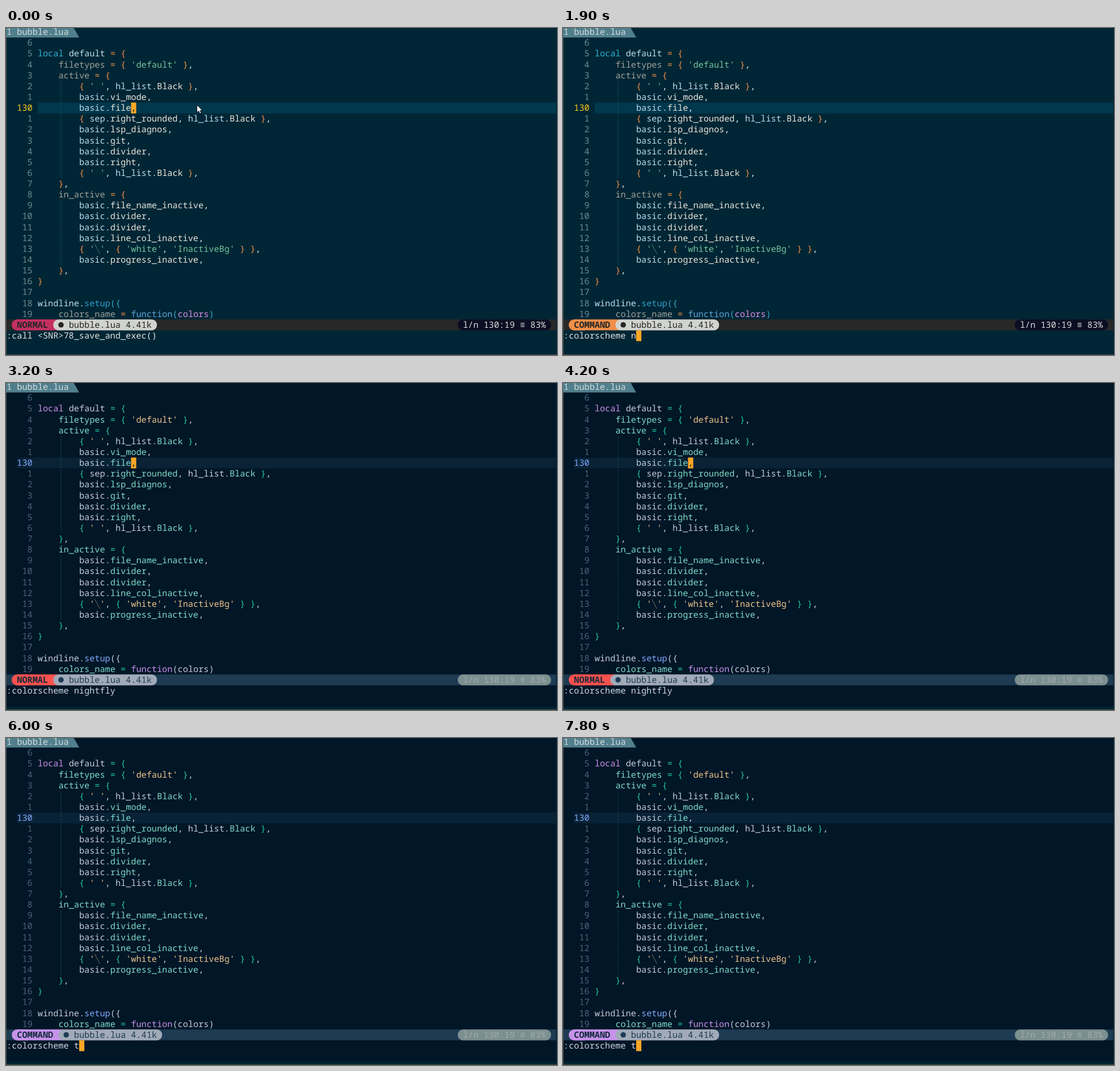
Write an HTML page that moves like this. It is 971 by 577 pixels and loops after 8000 ms.

```html
<!DOCTYPE html>
<html lang="en">
<head>
<meta charset="utf-8">
<title>Editor colorscheme</title>
<style>
html, body { margin: 0; width: 100%; height: 100%; overflow: hidden; background: #002635; }
svg {
  display: block; width: 971px; height: 577px;
  --bg: #002635; --line: #00384d; --num: #6c8b91; --now: #ffcc1b; --guide: #1b5260;
  --text: #d3e6ea; --var: #b9ddee; --field: #e6e6dc; --key: #a1a19a; --word: #2fb1d5;
  --func: #5fa8dc; --call: #2f9fc8; --param: #dd90e8; --op: #f08e48; --paren: #35a9cb;
  --str: #74c59b; --slash: #4b7a70; --cmd: #e0e3de;
  --bar: #282828; --normal: #c43060; --command: #f08e48; --mode: #262626;
  --file: #d0d3cf; --ink: #262626; --pos: #0b0e22; --posText: #dadcda;
}
svg.fly {
  --bg: #011627; --line: #092236; --num: #4b6479; --now: #82aaff; --guide: #1c4c58;
  --text: #c3ccdc; --var: #c3ccdc; --field: #7fdbca; --key: #7fdbca; --word: #c792ea;
  --func: #c792ea; --call: #82aaff; --param: #c3ccdc; --op: #21c7a8; --paren: #c3ccdc;
  --str: #ecc48d; --slash: #7d6d56; --cmd: #d0d6e0;
  --bar: #1d3b53; --normal: #fc514e; --command: #c792ea; --mode: #12293c;
  --file: #a1aab8; --ink: #1d3b53; --pos: #7c8f8f; --posText: #a1aab0;
}
svg.fly .equal { fill: #ff5874; }
text {
  font: 15.23px "Noto Sans Mono", "DejaVu Sans Mono", monospace;
  white-space: pre; text-rendering: geometricPrecision; font-variant-ligatures: none;
}
.bold { font-weight: 700; }
</style>
</head>
<body>
<svg id="stage" viewBox="0 0 971 577"></svg>
<script>
const CW = 9.139, RH = 19.135;
const colX = c => 1 + c * CW;
const rowY = r => -2.4 + r * RH;
const stage = document.getElementById('stage');

function add(tag, attrs, parent = stage) {
  const el = document.createElementNS('http://www.w3.org/2000/svg', tag);
  for (const name in attrs) el.setAttribute(name, attrs[name]);
  return parent.appendChild(el);
}
const paint = color => color[0] === '#' ? color : `var(--${color})`;
const rect = (x, y, width, height, color, rx = 0, parent = stage) =>
  add('rect', { x, y, width, height, rx, style: `fill:${paint(color)}` }, parent);
const cells = (col, row, count, color, parent) =>
  rect(colX(col), rowY(row), count * CW, RH, color, 0, parent);
const pill = (col, count, color, parent) =>
  rect(colX(col), rowY(27), count * CW, RH, color, 9.3, parent);
function write(str, col, row, color, parent, cls = '') {
  const el = add('text', { x: colX(col), y: rowY(row) + 14.6, class: cls,
    style: `fill:${paint(color)}` }, parent);
  el.textContent = str;
  return el;
}

const code = `
local default = {
    filetypes = { 'default' },
    active = {
        { ' ', hl_list.Black },
        basic.vi_mode,
        basic.file,
        { sep.right_rounded, hl_list.Black },
        basic.lsp_diagnos,
        basic.git,
        basic.divider,
        basic.right,
        { ' ', hl_list.Black },
    },
    in_active = {
        basic.file_name_inactive,
        basic.divider,
        basic.divider,
        basic.line_col_inactive,
        { ' ', { 'white', 'InactiveBg' } },
        basic.progress_inactive,
    },
}

windline.setup({
    colors_name = function(colors)`.split('\n');

const words = { local: 'word', function: 'func', setup: 'call', colors: 'param', default: 'var' };
function tokenColor(token, before, after) {
  if (token[0] === "'") return 'str';
  if (words[token]) return words[token];
  if (/\w/.test(token)) return before === '.' ? 'field' : after === '.' ? 'var' : 'key';
  if (/[()]/.test(token) || before === '(') return 'paren';
  return /[{}=]/.test(token) ? 'op' : 'text';
}

// Page, tab and cursor line
rect(1, 0, 969, rowY(30), 'bg');
add('path', { d: 'M0 0H119.5L129 16.7H0Z', fill: '#517f8d' });
write('1 bubble.lua', 0, 0, '#d3dcdb');
const lineBand = cells(6, 7, 100, 'line');
const numberBand = cells(2, 7, 4, 'line');

// Indent guides
for (const [from, to] of [[5, 14], [16, 22]])
  add('path', { d: `M${colX(10.5)} ${rowY(from) + 1}V${rowY(to)}`,
    style: 'stroke:var(--guide)', 'stroke-dasharray': '3 1.784' });

code.forEach((line, i) => {
  const row = i + 1, current = row === 7;
  const label = String(current ? 130 : Math.abs(row - 7));
  write(label, 5 - label.length, row, current ? 'now' : 'num');
  for (const { 0: token, index } of line.matchAll(/'[^']*'|\w+|\S/g)) {
    const color = tokenColor(token, line[index - 1], line[index + token.length]);
    write(token, index + 6, row, color, stage, token === '=' ? 'equal' : '');
  }
});
add('path', { d: `M${colX(17)} ${rowY(20) + 1}L${colX(18)} ${rowY(21) - 1}`,
  style: 'stroke:var(--slash)' });

// Status line
cells(0, 27, 106, 'bar');
function modeGroup(name, color) {
  const group = add('g', {}), n = name.length;
  pill(1, 4, color, group);
  cells(2, 27, n + 2, color, group);
  write(name, 2, 27, 'mode', group, 'bold');
  pill(n + 3, 20, 'file', group);
  add('circle', { cx: colX(n + 4.5), cy: rowY(27.5), r: 4.8, style: 'fill:var(--ink)' }, group);
  write('bubble.lua 4.41k', n + 6, 27, 'ink', group);
  return group;
}
const normal = modeGroup('NORMAL', 'normal');
const command = modeGroup('COMMAND', 'command');
pill(87, 18, 'pos');
write('l/n 130:19', 88, 27, 'posText');
write('≡', 99, 27, 'posText');
write('83%', 101, 27, 'posText');

// Command line, cursors and pointer
const prompt = write('', 0, 28, 'cmd');
const caret = cells(0, 28, 1, '#ffa726');
const block = add('g', {});
cells(24, 7, 1, '#ffa726', block);
write(',', 24, 7, '#002635', block);
const pointer = add('path', { d: 'M336.5 136V149L339.6 146.3L341.8 151L344 150L341.9 145.5H346Z',
  fill: '#fff', stroke: '#111', 'stroke-width': .9 });

// Window edge
add('path', { d: 'M.5 17V576.5H971', fill: 'none', stroke: '#4a5149' });

// Start time, command text, mode: n normal, b cursor blinked off, c typing
const steps = [
  [0, ':call <SNR>78_save_and_exec()', 'n'],
  [200, ':c', 'c'], [400, ':co', 'c'], [800, ':col', 'c'], [900, ':colorscheme', 'c'],
  [1400, ':colorscheme ', 'c'], [1900, ':colorscheme n', 'c'], [2300, ':colorscheme ni', 'c'],
  [2400, ':colorscheme nigh', 'c'], [3000, ':colorscheme nightfly', 'c'],
  [3200, ':colorscheme nightfly', 'n'], [3800, ':colorscheme nightfly', 'b'],
  [4200, ':colorscheme nightfly', 'n'],
  [4500, ':', 'c'], [4700, ':co', 'c'], [5000, ':col', 'c'], [5200, ':colorscheme', 'c'],
  [5500, ':colorscheme ', 'c'], [6000, ':colorscheme t', 'c'], [6500, '', 'n'],
  [6800, ':c', 'c'], [7000, ':co', 'c'], [7400, ':col', 'c'], [7500, ':colorscheme', 'c'],
  [7800, ':colorscheme t', 'c']
];
const show = (el, on) => { el.style.display = on ? '' : 'none'; };

function draw(now) {
  const t = now % 8000, fly = t >= 3200;
  const [, text, mode] = steps.findLast(step => step[0] <= t);
  const typing = mode === 'c';
  stage.classList.toggle('fly', fly);
  show(numberBand, fly);
  show(normal, !typing);
  show(command, typing);
  show(block, mode === 'n');
  show(caret, typing);
  show(pointer, t < 800);
  prompt.textContent = text;
  caret.setAttribute('x', colX(text.length));
}
function loop() {
  draw(performance.now());
  requestAnimationFrame(loop);
}
loop();
</script>
</body>
</html>
```
